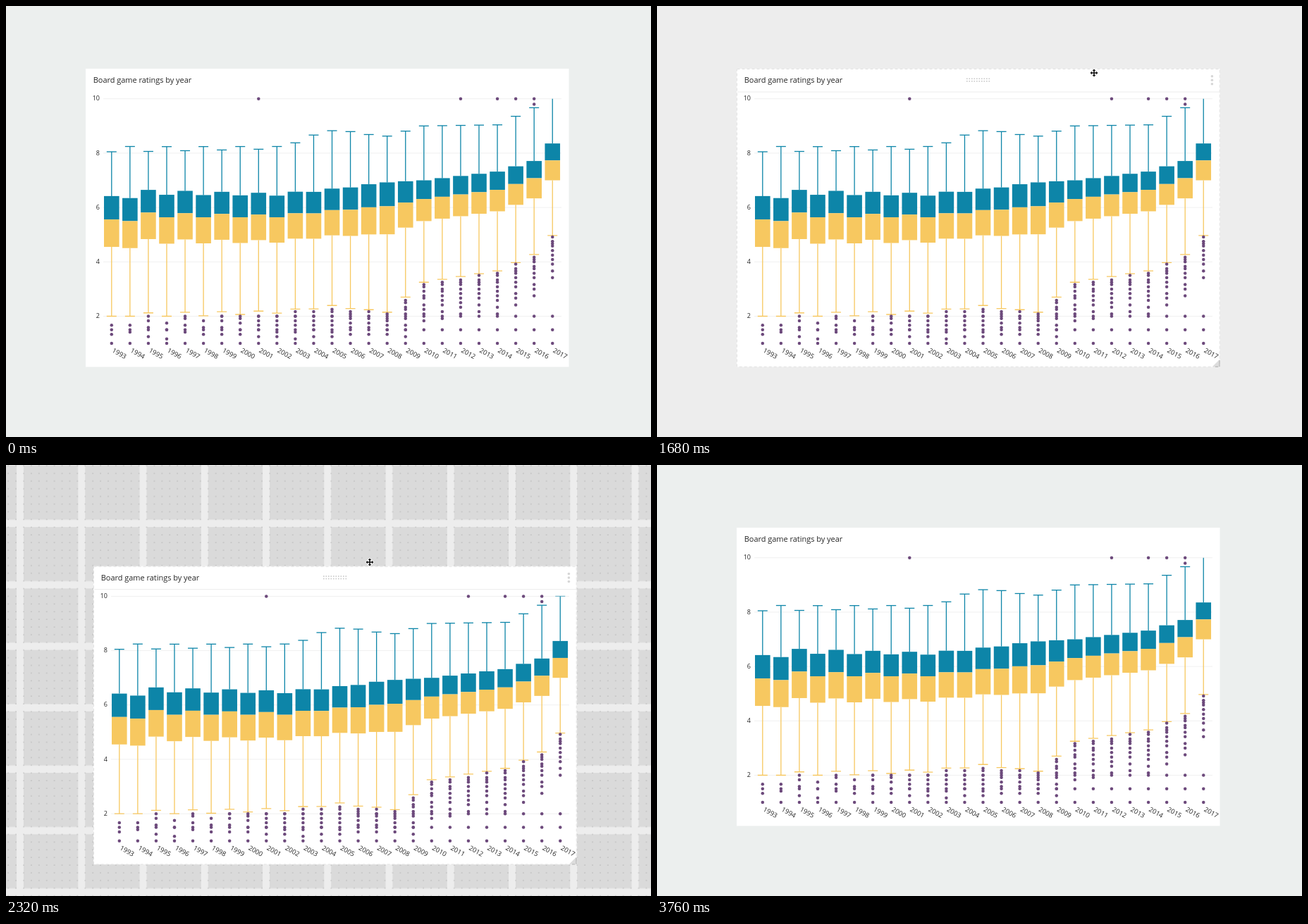
These frames come from a looping animation (915 by 612 pixels, 4.16 s). An HTML page:

```html
<!DOCTYPE html>
<html lang="en">
<head>
<meta charset="utf-8">
<title>Board game ratings by year</title>
<style>
html, body { margin: 0; width: 100%; height: 100%; overflow: hidden; background: #ecefee; }
svg { display: block; width: 915px; height: 612px; }
text { font-family: "Open Sans", "Noto Sans", sans-serif; fill: #262626; }
#tip text { fill: #fff; font-weight: 600; }
</style>
</head>
<body>
<svg id="stage" viewBox="0 0 915 612" xmlns="http://www.w3.org/2000/svg"></svg>
<script>
const LOOP = 4160, STEP = 80, COLS = 25, FIRST = 1993;
const TEAL = '#0d85a8', GOLD = '#f7c860', PLUM = '#6d4a7c';
const GAP = 87.25, PITCH = GAP / 8;

// Linear path through [position, ...values] points, held at both ends
function along(points, p) {
  const k = points.findIndex(q => q[0] > p);
  if (k < 1) return points[k < 0 ? points.length - 1 : 0].slice(1);
  const a = points[k - 1], b = points[k], f = (p - a[0]) / (b[0] - a[0]);
  return a.slice(1).map((v, j) => v + (b[j + 1] - v) * f);
}

// Trends of lower quartile, upper quartile and maximum over the years
const trend = [
  [0, 4.45, 6.32, 8.15], [2, 4.75, 6.56, 8.15], [9, 4.75, 6.48, 8.2], [12, 4.95, 6.67, 8.85],
  [15, 5.02, 6.93, 8.62], [17, 5.5, 7, 9], [21, 5.86, 7.32, 9.04], [23, 6.335, 7.71, 9.67],
  [24, 7, 8.355, 10]
];
const peaks = [[8, 10], [19, 10], [21, 10], [22, 10], [23, 10], [23, 9.8]];

function stats(i) {
  const ripple = 0.1 * Math.cos(Math.PI * i) * Math.max(0, 1 - i / 16);
  const [low, high, top] = along(trend, i);
  const q1 = low + ripple, q3 = high + ripple, range = q3 - q1;
  return { max: top - ripple, q3, median: q1 + 0.54 * range, q1, min: Math.max(2, q1 - 1.5 * range) };
}

// A tail below the whisker, thinning out downwards and denser in later years
function outliers(i, min) {
  const list = [1, 1.5, ...(min > 2.05 ? [2] : [])];
  let gap = 0.083 + 0.25 * Math.exp(-i / 6);
  for (let v = min - gap; v > Math.max(1.2, min - 1.6); v -= gap *= 1.12)
    list.push(Math.round(v * 12) / 12);
  return list.concat(peaks.filter(p => p[0] === i).map(p => p[1]));
}

const colX = i => 149.8 + i * 26.06;
const valY = v => 131.7 + (10 - v) * 38.6;
const rect = (x, y, w, h, fill, more = '') =>
  `<rect x="${x}" y="${y}" width="${w}" height="${h}" fill="${fill}" ${more}/>`;
const dot = (x, y, r, fill) => `<circle cx="${x}" cy="${y}" r="${r}" fill="${fill}"/>`;
const path = (d, stroke, w, more = '') =>
  `<path d="${d}" fill="none" stroke="${stroke}" stroke-width="${w}" ${more}/>`;
const label = (x, y, size, s, more = '') =>
  `<text x="${x}" y="${y}" font-size="${size}" ${more}>${s}</text>`;
const repeat = (n, f) => Array.from({ length: n }, (_, i) => f(i)).join('');

function column(i) {
  const x = colX(i), s = stats(i);
  const [top, q3, mid, q1, low] = [s.max, s.q3, s.median, s.q1, s.min].map(valY);
  const cap = y => `M${x - 7} ${y}h14`;
  const faint = i === COLS - 1 ? 'id="topCap"' : '';
  return path(`M${x} ${top}V${q3}`, TEAL, 1.3) + path(cap(top), TEAL, 1.3, faint) +
    path(`M${x} ${q1}V${low}${cap(low)}`, GOLD, 1.3) +
    rect(x - 10.8, q3, 21.6, mid - q3, TEAL) + rect(x - 10.8, mid, 21.6, q1 - mid, GOLD) +
    outliers(i, s.min).map(v => dot(x, valY(v), 2.25, PLUM)).join('') +
    `<g transform="translate(${x} 491) rotate(29)">${label(0, 0, 9.4, FIRST + i)}</g>`;
}

function chrome() {
  return rect(113.5, 89.5, 684.7, 422.8, 'none', 'stroke="#e2e2e2" stroke-dasharray="4 3"') +
    path('M114 122H798', '#ececec', 1) +
    repeat(20, i => rect(439 + (i % 10) * 3.5, i < 10 ? 102.5 : 106, 1.6, 1.6, '#c8c8c8')) +
    repeat(3, i => dot(787.4, 99.8 + i * 5.5, 1.8, '#d6d6d6')) +
    '<path d="M788 512L798 502V512Z" fill="#dcdcdc"/>' +
    path('M798 503V512M792 512.3H796', '#a5a5a5', 0.9);
}

function gridPattern() {
  const dots = repeat(64, i => dot(4 + (i % 8) * PITCH, 4 + (i >> 3) * PITCH, 0.65, '#9c9c9c'));
  return `<pattern id="tiles" x="21" y="-3.1" width="${GAP}" height="${GAP}" patternUnits="userSpaceOnUse">` +
    rect(4, 4, 77.2, 76.8, '#dadada') + dots + '</pattern>';
}

function axisLine(k) {
  const v = 10 - 2 * k, y = valY(v);
  return path(`M138 ${y}H788`, '#f0f0f0', 1) + label(133, y + 2.6, 9, v, 'text-anchor="end"');
}

const arm = 'M-.8 -.8V-3H-2.3L0 -5.5L2.3 -3H.8V.8Z';
const mover = repeat(4, i => `<path d="${arm}" transform="rotate(${i * 90})"/>`);
const stage = document.getElementById('stage');
stage.innerHTML = `<defs>${gridPattern()}<g id="cross">${mover}</g></defs>` +
  rect(0, 0, 915, 612, '#ecefee', 'id="back"') +
  rect(0, 0, 915, 612, 'url(#tiles)', 'id="grid"') +
  '<g id="card">' + rect(113, 89, 685.5, 423.5, '#fff') +
  `<g id="chrome">${chrome()}</g>` +
  label(123.7, 109, 10.95, 'Board game ratings by year') +
  repeat(5, axisLine) + repeat(COLS, column) + '</g>' +
  '<g id="tip"></g>' +
  '<path id="arrow" d="M0 0V10.5L2.5 8.3L4.2 12L6 11.2L4.4 7.6H7.6Z" fill="#111" stroke="#fff"/>' +
  '<g id="mover"><use href="#cross" stroke="#fff" stroke-width="1.6"/><use href="#cross" fill="#111"/></g>';

const el = {};
for (const id of ['back', 'grid', 'card', 'chrome', 'tip', 'arrow', 'mover', 'topCap'])
  el[id] = document.getElementById(id);

// Pointer stops: time, x, y
const route = [
  [80, 905, 117], [480, 776, 215], [720, 562, 285], [850, 284, 470], [1000, 284, 470],
  [1280, 530, 105], [1400, 530, 105], [1680, 620, 95], [1760, 640, 108], [1920, 628, 149],
  [2000, 614, 162], [2240, 541, 159.7], [2320, 516, 138], [2480, 505, 116], [2560, 505, 116],
  [2880, 530, 105], [2960, 529, 105]
];
const pointer = t => along(route, t);

function tooltip(i) {
  const s = stats(i), x = colX(i) - 92.8, y = valY(s.median) - 52.2;
  const rows = [['Maximum', s.max], ['Upper Quartile', s.q3], ['Median', s.median],
    ['Lower Quartile', s.q1], ['Minimum', s.min]];
  return rect(x, y, 89, 107.2, '#000', 'rx="3"') +
    `<path d="M${x + 88.8} ${y + 49.2}l4 4l-4 4z"/>` +
    label(x + 7.5, y + 17.6, 7.5, FIRST + i) +
    rows.map(([name, value], r) => {
      const base = y + 33.1 + r * 15.6;
      return label(x + 7.5, base, 7.5, name + ':') + label(x + 66, base, 7.5, +value.toFixed(2));
    }).join('');
}

const within = (t, a, b) => t >= a && t < b;
const show = (node, on) => node.setAttribute('visibility', on ? 'visible' : 'hidden');

function draw(t) {
  const editing = within(t, 480, 3280), dragging = within(t, 1760, 3200);
  const [x, y] = pointer(t);
  // The card trails the pointer by one step
  const [hx, hy] = pointer(t - STEP);
  const moved = within(t, 1760, 2960);
  el.card.setAttribute('transform', moved ? `translate(${hx - 530} ${hy - 105})` : '');
  el.back.setAttribute('fill', editing ? '#ededed' : '#ecefee');
  show(el.grid, dragging);
  el.grid.setAttribute('opacity', t >= 3120 ? 0.5 : 1);
  show(el.chrome, editing);
  el.topCap.setAttribute('opacity', dragging ? 0.5 : 0);
  show(el.arrow, t === 80 || within(t, 480, 1200));
  show(el.mover, within(t, 1200, 3120));
  for (const c of [el.arrow, el.mover]) c.setAttribute('transform', `translate(${x} ${y})`);
  // The tooltip lags slightly behind the pointer
  const hover = Math.round((pointer(t - 25)[0] - colX(0)) / 26.06);
  el.tip.innerHTML = within(t, 560, 1040) ? tooltip(hover) : '';
}

const start = performance.now();
let last = -1;
function tick() {
  const t = Math.floor((performance.now() - start) % LOOP / STEP) * STEP;
  if (t !== last) draw(last = t);
  requestAnimationFrame(tick);
}
tick();
</script>
</body>
</html>
```
